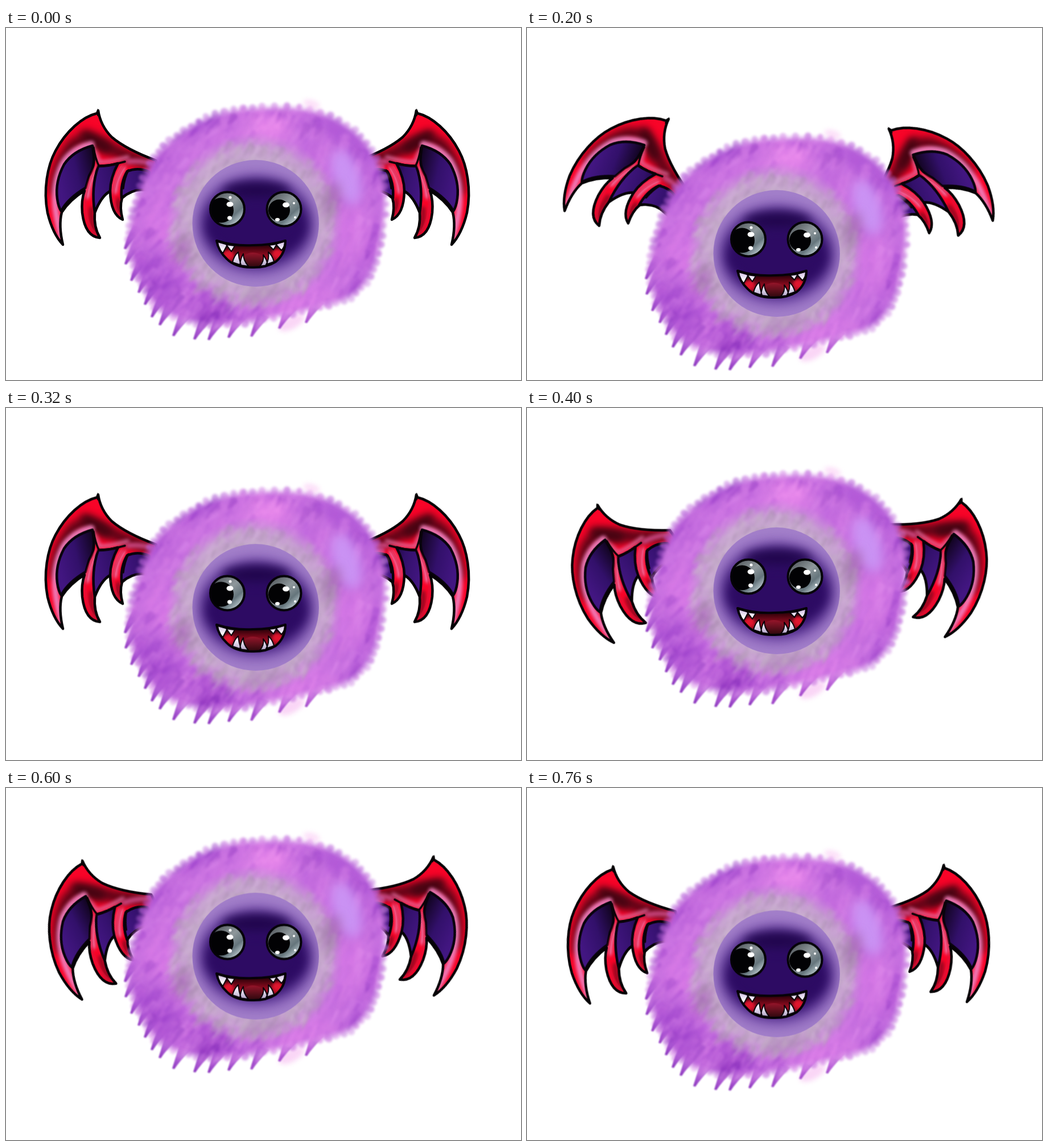
Write an HTML page with a canvas that moves like this. It is 905x619 px and loops after 800 ms.

```html
<!DOCTYPE html>
<html lang="en">
<head>
<meta charset="utf-8">
<title>Fluffy winged monster</title>
<style>
html, body { margin: 0; width: 100%; height: 100%; overflow: hidden; background: #fff; }
canvas { display: block; }
</style>
</head>
<body>
<canvas id="stage" width="905" height="619"></canvas>
<script>
const W = 905, H = 619, LOOP = 800, STEP = 40;
const stage = document.getElementById('stage').getContext('2d');

let seed = 20;
function rand(min = 0, max = 1) {
  seed = (seed * 1664525 + 1013904223) % 4294967296;
  return min + (max - min) * seed / 4294967296;
}
const pick = list => list[Math.floor(rand(0, list.length))];

function layer(paint) {
  const canvas = document.createElement('canvas');
  canvas.width = W;
  canvas.height = H;
  const c = canvas.getContext('2d');
  c.lineCap = c.lineJoin = 'round';
  paint(c);
  return canvas;
}

function fill(c, shape, style) {
  c.fillStyle = style;
  c.fill(new Path2D(shape));
}

function line(c, shape, style, width) {
  c.strokeStyle = style;
  c.lineWidth = width;
  c.stroke(new Path2D(shape));
}

function soft(c, blur, paint) {
  c.save();
  c.filter = `blur(${blur}px)`;
  paint();
  c.restore();
}

function ellipse(c, x, y, rx, ry, style, turn = 0) {
  c.fillStyle = style;
  c.beginPath();
  c.ellipse(x, y, rx, ry, turn, 0, 7);
  c.fill();
}

function gradient(g, ...stops) {
  stops.forEach(([at, color]) => g.addColorStop(at, color));
  return g;
}

// Wing
const SILHOUETTE = 'M162 145Q166 172 186 192Q212 214 264 233L278 290L242 285Q222 283 204 299' +
  'Q199 315 205 337Q184 328 183 287Q167 296 156 325Q154 350 165 369Q139 367 134 325' +
  'Q132 303 138 286Q112 302 98 324Q92 348 100 381Q82 362 73 325C65 284 73 242 87 216C105 182 134 156 160 150Z';
const MEMBRANES = [
  'M152 207Q118 216 102 240Q86 270 90 300Q92 315 97 322Q108 300 140 281L146 260Q157 243 154 222Z',
  'M162 243Q180 243 197 238Q183 264 183 287Q167 296 156 325Q149 280 162 243Z',
  'M213 252Q232 244 252 253L262 286Q222 282 203 299Q201 272 213 252Z'
];
const FINGERS = 'M160 240Q140 275 139 310Q141 348 158 363M207 242Q188 270 189 295Q190 320 201 330';

const wing = layer(c => {
  c.save();
  c.clip(new Path2D(SILHOUETTE));
  fill(c, SILHOUETTE, '#f80428');
  soft(c, 7, () => {
    line(c, 'M88 285Q88 242 116 207Q142 186 170 204Q200 222 250 238', '#5c0517', 21);
    line(c, 'M140 188L176 212', '#430411', 18);
  });
  soft(c, 3, () => {
    line(c, 'M98 370Q85 325 86 295Q86 262 102 234Q120 210 150 204', '#ef7fbd', 10);
    line(c, 'M150 206Q160 224 164 236Q184 236 214 227', '#df6a9c', 6);
    line(c, 'M214 235Q236 232 262 240', '#c7467e', 9);
    line(c, 'M158 246Q144 272 142 296', '#ec7cae', 9);
    line(c, 'M206 246Q193 264 191 288', '#ec7cae', 8);
    line(c, 'M150 318Q148 342 158 360M198 302Q194 314 200 328', '#8d0820', 8);
  });
  MEMBRANES.forEach((shape, i) => {
    const x = [90, 148, 202][i];
    fill(c, shape, gradient(c.createLinearGradient(x, 260, x + 68, 245),
      [0, '#421681'], [.5, '#32106a'], [1, '#120421']));
    line(c, shape, '#08030c', 4.5);
  });
  line(c, FINGERS, 'rgba(225,20,58,.5)', 5);
  line(c, 'M154 210Q157 230 163 242Q180 243 209 235M215 250Q208 264 206 282', '#0b0307', 3.5);
  c.restore();
  line(c, SILHOUETTE, '#050205', 4.5);
  fill(c, 'M161 141L167 160L160 154Z', '#050205');
});

// Fur
const OUTLINE = [
  450, 140, 400, 144, 352, 158, 312, 180, 278, 208, 252, 238, 238, 278, 224, 320, 216, 360, 217, 395,
  228, 430, 246, 462, 262, 490, 295, 508, 335, 520, 375, 520, 420, 518, 470, 508, 520, 498, 565, 486,
  605, 474, 632, 448, 650, 412, 661, 365, 667, 310, 664, 262, 643, 214, 612, 180, 570, 154, 515, 140
];
const SPIKES = [
  [209, 388], [210, 415], [220, 444], [233, 465], [244, 486], [256, 508], [270, 522], [294, 541],
  [331, 547], [356, 548], [391, 544], [431, 542], [480, 528], [527, 518]
];
const FUR = ['#c870e0', '#d67de6', '#ba60da', '#e08dec', '#bf68dc', '#cf75e2'];
const DARK_FUR = ['#8d2fc4', '#a244cf', '#7c24b4', '#b358d6'];
const GREY_FUR = ['#c9b3cc', '#b79dbb', '#d2b6d7', '#a98db0'];

const outlinePoint = i => {
  const k = i * 2 % OUTLINE.length;
  return [OUTLINE[k], OUTLINE[k + 1]];
};
const mix = (a, b, u) => a + (b - a) * u;

function bodyPath(c) {
  const n = OUTLINE.length / 2;
  c.beginPath();
  for (let i = 0; i <= n; i++) {
    const [x, y] = outlinePoint(i), [nx, ny] = outlinePoint(i + 1);
    c.quadraticCurveTo(x, y, (x + nx) / 2, (y + ny) / 2);
  }
}

function tuft(c, x, y, length, width, color, alpha) {
  const lean = mix(2.35, 1.95, (x - 210) / 460) + rand(-.2, .2);
  const dx = Math.cos(lean), dy = Math.sin(lean), w = width / 2;
  c.globalAlpha = alpha;
  c.fillStyle = color;
  c.beginPath();
  c.moveTo(x - dy * w, y + dx * w);
  c.quadraticCurveTo(x - dx * w, y - dy * w, x + dy * w, y - dx * w);
  c.quadraticCurveTo(x + dx * length * .5 + dy * w, y + dy * length * .5 - dx * w, x + dx * length, y + dy * length);
  c.closePath();
  c.fill();
  c.globalAlpha = 1;
}

const tufts = layer(c => {
  for (let i = 0; i < 1700; i++) {
    const a = rand(0, 2 * Math.PI), r = Math.sqrt(rand(.2, 1.05));
    const x = 440 + 230 * r * Math.cos(a), y = 335 + 200 * r * Math.sin(a);
    const shaded = r > .75 && x < 450 && y > 300 || r > .9;
    const color = pick(shaded && rand() < .35 ? DARK_FUR : FUR);
    tuft(c, x, y, rand(14, 38), rand(6, 16), color, rand(.1, .35));
  }
});

const greyTufts = layer(c => {
  for (let i = 0; i < 520; i++) {
    const a = rand(0, 2 * Math.PI), r = rand(104, 146);
    tuft(c, 437 + r * Math.cos(a), 340 + r * Math.sin(a), rand(10, 28), rand(5, 13), pick(GREY_FUR), rand(.15, .4));
  }
});

function paintFringe(c) {
  const n = OUTLINE.length / 2;
  soft(c, 2, () => {
    for (let i = 0; i < n * 3; i++) {
      const [x0, y0] = outlinePoint(Math.floor(i / 3)), [x1, y1] = outlinePoint(Math.floor(i / 3) + 1);
      const x = mix(x0, x1, i % 3 / 3), y = mix(y0, y1, i % 3 / 3);
      const a = Math.atan2(y - 335, x - 440) + rand(-.2, .2), reach = rand(1, 4);
      c.globalAlpha = rand(.35, .6);
      line(c, `M${x} ${y}l${Math.cos(a) * reach} ${Math.sin(a) * reach}`, pick(FUR), rand(9, 13));
    }
    c.globalAlpha = 1;
  });
  soft(c, .9, () => {
    SPIKES.forEach(([x, y], i) => {
      const dx = 22, dy = -42, w = i < 6 ? 7 : 10;
      const color = gradient(c.createLinearGradient(x, y, x + dx, y + dy),
        [0, '#8d38bf'], [.35, '#ab59d3'], [1, 'rgba(196,103,221,.5)']);
      fill(c, `M${x - 2} ${y}Q${x + dx / 2 - 7} ${y + dy / 2} ${x + dx - w} ${y + dy}` +
        `L${x + dx + w} ${y + dy + 8}Q${x + 11} ${y - 13} ${x + 2} ${y + 1}Z`, color);
    });
  });
}

function paintPatches(c) {
  soft(c, 12, () => {
    ellipse(c, 270, 440, 55, 30, 'rgba(145,50,198,.6)', .9);
    ellipse(c, 360, 498, 35, 25, 'rgba(128,35,184,.85)', -.9);
    ellipse(c, 263, 232, 30, 20, 'rgba(148,55,200,.6)', -.8);
    ellipse(c, 340, 168, 50, 13, 'rgba(151,64,205,.55)', -.4);
    ellipse(c, 600, 196, 65, 20, 'rgba(157,68,207,.55)', .75);
    ellipse(c, 632, 420, 22, 50, 'rgba(160,70,208,.5)', .3);
    ellipse(c, 460, 175, 48, 28, 'rgba(240,145,240,.85)');
    ellipse(c, 270, 340, 28, 45, 'rgba(224,125,234,.7)');
    ellipse(c, 520, 485, 55, 22, 'rgba(228,132,237,.8)', -.4);
    ellipse(c, 610, 365, 34, 55, 'rgba(222,122,234,.6)');
  });
}

// Face
const MOUTH = 'M370 374Q402 384 434 382Q465 382 491 374Q491 397 474 411Q457 422 431 421Q402 421 388 406Q373 392 370 374Z';
const TEETH = [
  'M372 376Q373 390 381 396L389 381ZM387 381L396 393L402 383Z',
  'M462 382L470 390L476 380ZM474 380L484 391Q490 385 490 375Z',
  'M398 412Q401 400 408 394Q409 405 413 417ZM411 417Q412 405 417 397Q417 409 426 419Z',
  'M446 419Q454 410 452 399Q458 406 460 417ZM457 416Q463 406 461 394Q468 400 471 411Z'
];

function paintEye(c, x, pupilX, pupilR) {
  const y = 318.5;
  ellipse(c, x, y, 31, 31, gradient(c.createLinearGradient(x - 20, y - 26, x + 22, y + 22),
    [0, '#555b60'], [.45, '#8f989c'], [.75, '#65757c'], [1, '#bccbd0']));
  c.save();
  c.beginPath();
  c.arc(x, y, 30, 0, 7);
  c.clip();
  ellipse(c, pupilX, y + 2, pupilR, pupilR, '#020204');
  c.restore();
  c.strokeStyle = '#050308';
  c.lineWidth = 4;
  c.beginPath();
  c.arc(x, y, 30, 0, 7);
  c.stroke();
}

function paintMouth(c) {
  c.save();
  c.clip(new Path2D(MOUTH));
  fill(c, MOUTH, gradient(c.createLinearGradient(0, 382, 0, 421),
    [0, '#2c0109'], [.35, '#79091b'], [.6, '#a50c22'], [1, '#3a0610']));
  soft(c, 2, () => {
    ellipse(c, 391, 399, 9, 8, '#df162e');
    ellipse(c, 477, 397, 9, 8, '#df162e');
  });
  fill(c, 'M420 399Q433 391 449 399L453 423H416Z', gradient(c.createLinearGradient(0, 395, 0, 421),
    [0, '#95152a'], [.45, '#65101e'], [1, '#2b070d']));
  c.restore();
  TEETH.forEach(shape => {
    fill(c, shape, gradient(c.createLinearGradient(0, 376, 0, 418), [0, '#cfbbe2'], [.35, '#fff'], [.6, '#f5f1fb'], [1, '#b7a8cb']));
    line(c, shape, '#090309', 2);
  });
  line(c, MOUTH, '#050207', 4);
}

function paintFace(c) {
  ellipse(c, 438.7, 343.5, 111.3, 111.5, '#a37fca');
  c.save();
  c.beginPath();
  c.arc(438.7, 343.5, 111, 0, 7);
  c.clip();
  soft(c, 12, () => {
    ellipse(c, 439, 346, 101, 87, '#7850b0');
    ellipse(c, 440, 344, 94, 74, '#2e0d65');
  });
  soft(c, 9, () => {
    ellipse(c, 440, 286, 58, 15, '#22074e');
    ellipse(c, 440, 350, 84, 45, '#2d0b63');
  });
  c.restore();
  paintEye(c, 389, 378, 22);
  paintEye(c, 488.5, 480, 19);
  [[393.5, 310, 6, 4.5], [394, 298, 2.5, 2.5], [393, 334, 4, 3.5],
   [492, 311, 6, 4.5], [506, 308, 2, 2], [508, 333, 2, 2], [477, 337, 4, 3]]
    .forEach(([x, y, rx, ry]) => ellipse(c, x, y, rx, ry, '#fff'));
  paintMouth(c);
}

const body = layer(c => {
  soft(c, 4, () => {
    bodyPath(c);
    c.fillStyle = '#c76fe0';
    c.fill();
  });
  paintFringe(c);
  c.globalCompositeOperation = 'source-atop';
  paintPatches(c);
  soft(c, 2, () => c.drawImage(tufts, 0, 0));
  soft(c, 9, () => {
    ellipse(c, 598, 262, 23, 50, 'rgba(203,150,247,.9)', -.3);
    ellipse(c, 467, 174, 28, 18, 'rgba(240,140,238,.6)');
  });
  ellipse(c, 437, 340, 160, 160, gradient(c.createRadialGradient(437, 340, 105, 437, 340, 156),
    [0, 'rgba(197,174,203,.95)'], [.45, 'rgba(200,173,207,.75)'], [1, 'rgba(200,150,214,0)']));
  soft(c, 2, () => c.drawImage(greyTufts, 0, 0));
  soft(c, 9, () => {
    ellipse(c, 572, 305, 13, 35, 'rgba(139,99,150,.5)', .3);
    ellipse(c, 310, 390, 12, 30, 'rgba(151,86,166,.45)', .5);
    ellipse(c, 455, 468, 40, 9, 'rgba(150,112,161,.4)', -.2);
  });
  c.globalCompositeOperation = 'destination-over';
  soft(c, 4, () => {
    ellipse(c, 537, 134, 15, 7, 'rgba(250,205,244,.65)', .3);
    ellipse(c, 502, 518, 25, 11, 'rgba(249,200,243,.75)', -.5);
  });
  c.globalCompositeOperation = 'source-over';
  paintFace(c);
});

// Motion: time, vertical offset, wing angle in degrees, easing towards the next key
const KEYS = [
  [0, 0, 0, 0],
  [200, 53, 33.8, .05],
  [400, -22, -21.5, .05],
  [520, -62, -18.9, -.11],
  [840, 0, 0, 0]
];

function pose(t) {
  const i = KEYS.findIndex(key => key[0] > t);
  const [t0, y0, a0, ease] = KEYS[i - 1], [t1, y1, a1] = KEYS[i];
  const u = (t - t0) / (t1 - t0), v = u + ease * u * (1 - u);
  return { y: mix(y0, y1, v), angle: mix(a0, a1, v) * Math.PI / 180 };
}

function drawWing(x, y, angle, mirrored) {
  stage.save();
  stage.translate(x, y);
  stage.rotate(angle);
  stage.translate(-x, -y);
  if (mirrored) {
    stage.translate(883, 0);
    stage.scale(-1, 1);
  }
  stage.drawImage(wing, 0, 0);
  stage.restore();
}

function draw(now) {
  const { y, angle } = pose(Math.floor(now % LOOP / STEP) * STEP);
  stage.fillStyle = '#fff';
  stage.fillRect(0, 0, W, H);
  stage.save();
  stage.translate(0, y);
  drawWing(268, 269, angle, false);
  drawWing(644, 275, -angle, true);
  stage.drawImage(body, 0, 0);
  stage.restore();
}

const start = performance.now();
function tick() {
  draw(performance.now() - start);
  requestAnimationFrame(tick);
}
tick();
</script>
</body>
</html>
```
